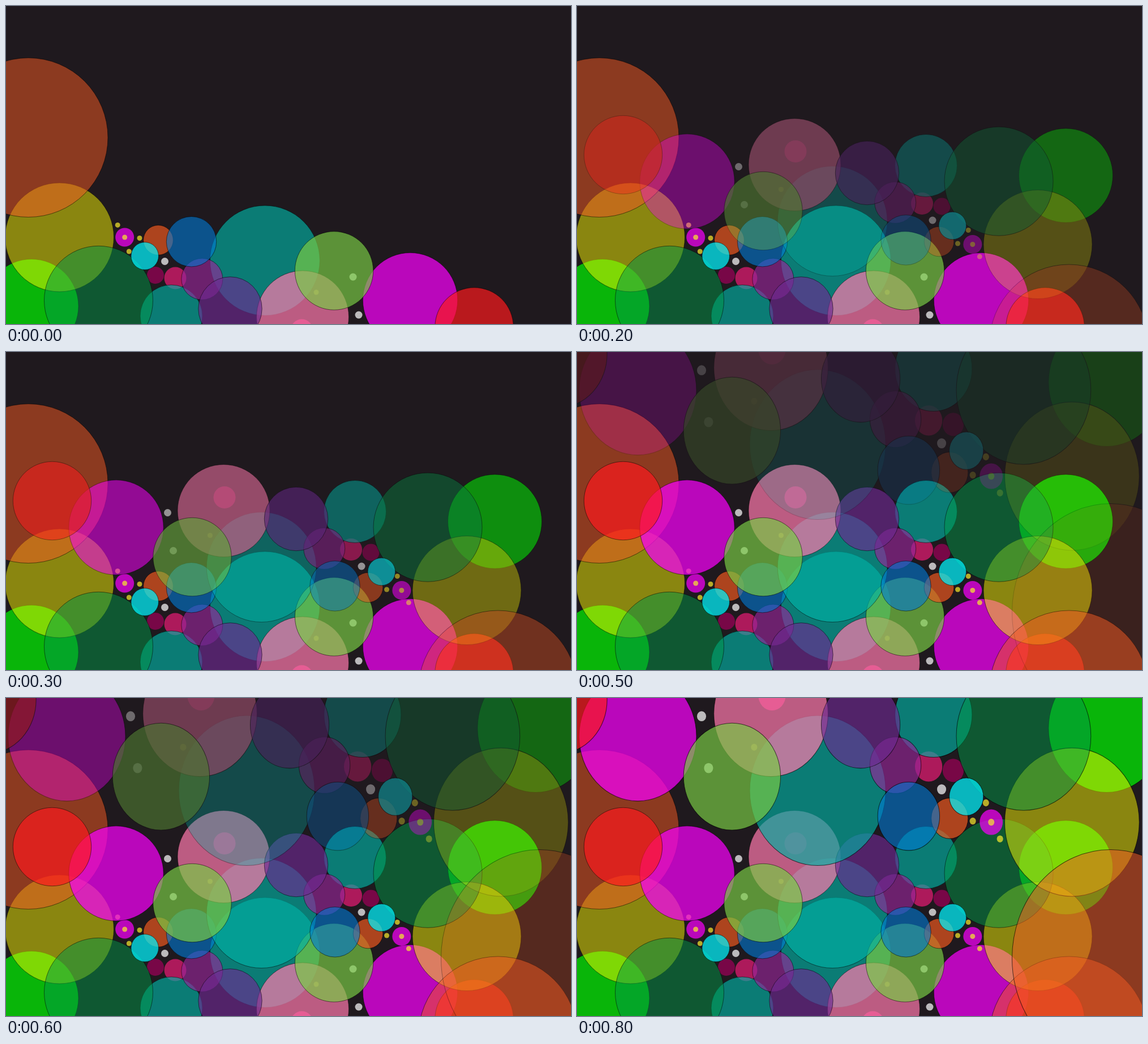
Recreate the animation shown at these times as an HTML page. Size 998 by 561 pixels, loop 0.9 s.

```html
<!DOCTYPE html>
<html lang="en">
<head>
<meta charset="utf-8">
<title>Bubbles</title>
<style>
  html, body { margin: 0; width: 100%; height: 100%; overflow: hidden; background: #1f191e; }
  svg { display: block; }
</style>
</head>
<body>
<svg width="998" height="561" viewBox="0 0 998 561">
  <defs><g id="cluster"></g></defs>
  <use href="#cluster"/>
  <use id="second" href="#cluster" transform="translate(908.5 828.5) scale(-1)"/>
  <use id="third" href="#cluster" transform="translate(991.3 775.6) scale(-1.238 -1.364)"/>
</svg>
<script>
const GREEN = '#00f800b3', OLIVE = '#fffc007a', BROWN = '#f0582485', FOREST = '#01974680',
  CRIMSON = '#f91b7da6', WHITE = '#ffffffb3', YELLOW = '#faeb2cb3', TEAL = '#00b1a5a6',
  MAROON = '#9e0058b3', MAGENTA = '#f600f8b8', ORANGE = '#ea581eb3', CYAN = '#00f3fcb8',
  PURPLE = '#952599a6', BLUE = '#007ad599', PINK = '#ff79adb3', VIOLET = '#6c2a90a8',
  LIME = '#7acc45ad', RED = '#fe1a1eb0';

// Bottom to top: centre x, centre y, radius, translucent fill
const bubbles = [
  [45, 529.5, 83, GREEN],
  [94.5, 408, 96, OLIVE],
  [39.5, 232, 140.5, BROWN],
  [522.5, 572, 19.5, CRIMSON],
  [280.5, 450.5, 6.5, WHITE],
  [613, 478, 6.5, WHITE],
  [623, 545, 6.5, WHITE],
  [548, 505, 4.5, YELLOW],
  [457.3, 449, 97, TEAL],
  [264, 475, 15, MAROON],
  [299, 480, 19.5, CRIMSON],
  [292, 547, 55, TEAL],
  [163.5, 519.3, 96, FOREST],
  [209.7, 408, 16.5, MAGENTA],
  [209.7, 408, 4.5, YELLOW],
  [197.2, 386.4, 4.5, YELLOW],
  [236, 409.5, 4.5, YELLOW],
  [217.3, 433, 4.5, YELLOW],
  [269, 413, 26.3, ORANGE],
  [245.2, 441, 24.3, CYAN],
  [346.3, 481.7, 36.5, PURPLE],
  [327.5, 415.7, 44.2, BLUE],
  [524, 548.5, 81.5, PINK],
  [396, 534, 56.2, VIOLET],
  [714, 519, 83.7, MAGENTA],
  [579.5, 467, 69.2, LIME],
  [827, 566, 69.2, RED],
];

const cluster = document.getElementById('cluster');
for (const [cx, cy, r, fill] of bubbles) {
  const circle = document.createElementNS('http://www.w3.org/2000/svg', 'circle');
  const attributes = { cx, cy, r, fill };
  if (r > 20) Object.assign(attributes, { stroke: '#000', 'stroke-opacity': 0.65, 'stroke-width': 0.8 });
  for (const name in attributes) circle.setAttribute(name, attributes[name]);
  cluster.append(circle);
}

const second = document.getElementById('second');
const third = document.getElementById('third');
const clamp = v => Math.min(1, Math.max(0, v));

// Nine 100 ms steps; each copy fades in over four of them.
function draw() {
  const step = Math.floor(performance.now() % 900 / 100);
  second.setAttribute('opacity', clamp(step / 4));
  third.setAttribute('opacity', clamp((step - 4) / 4));
  requestAnimationFrame(draw);
}
draw();
</script>
</body>
</html>
```
